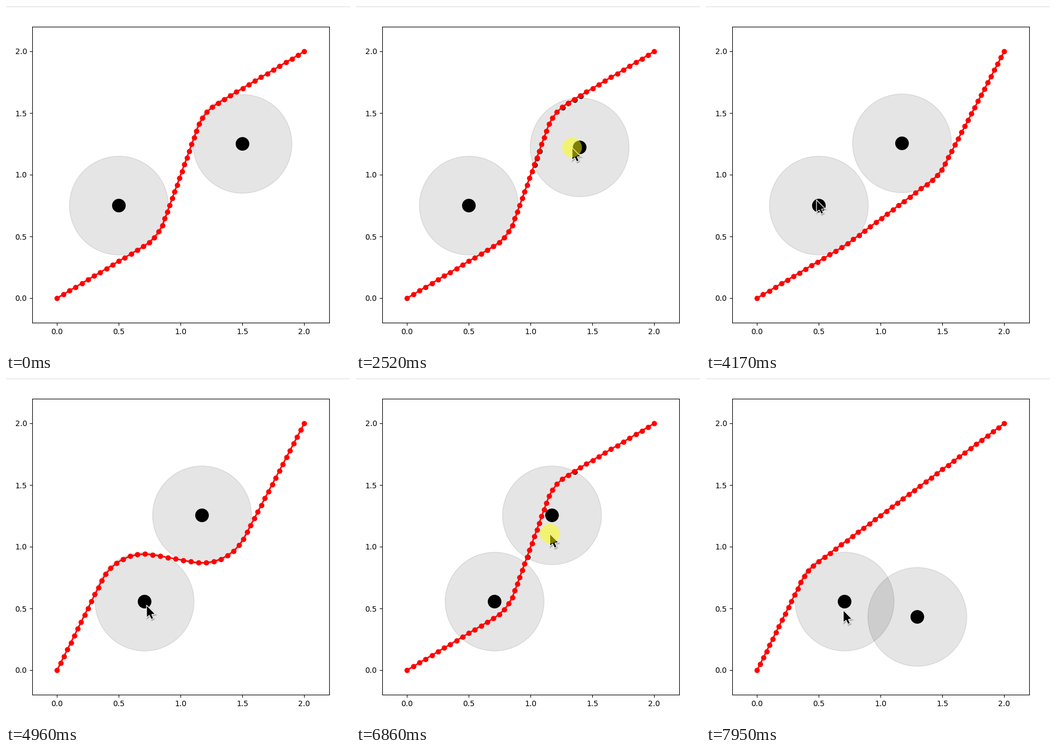
Recreate the animation shown at these times as a matplotlib script. Size 629 by 630 pixels, loop 8000 ms.

```python
import math

import numpy as np
import matplotlib.pyplot as plt
from matplotlib.animation import FuncAnimation
from matplotlib.lines import Line2D
from matplotlib.patches import Circle, Polygon

W, H, DPI = 629, 630, 100
STEP, LOOP = 20, 8000
SCALE = 226.0            # pixels per data unit
X0, Y0 = 93.4, 535.0     # pixel position of the data origin
RADIUS, CORE = 0.4, 0.052
CLEARANCE = 0.386        # radius the path keeps around a disc
POINTS = 52
LAG = 80                 # ms the dragged disc trails the pointer

# pointer moves: begin, end, goal and, for curved ones, a control point
ENTRY = (535, 628)
MOVES = [
    (350, 1170, (464, 288), (340, 390)),
    (1420, 1700, (458, 254)),
    (1880, 2140, (432, 252)),
    (2200, 2840, (358, 251), (395, 267)),
    (3060, 3500, (243, 283)),
    (3520, 4080, (202, 355)),
    (4200, 4270, (210, 372)),
    (4340, 4800, (257, 416)),
    (5140, 5860, (388, 322)),
    (5960, 6100, (391, 284)),
    (6100, 6640, (357, 254)),
    (6790, 7000, (347, 374)),
    (7000, 7250, (385, 440)),
    (7440, 7920, (251, 425), (340, 475)),
]

# disc index, press time, release time
DRAGS = [(1, 2180, 3000), (0, 4290, 4920), (1, 6750, 7400)]
# side of each disc kept by the path after every release; 0 ignores the disc
SIDES = [(1, -1), (1, 1), (-1, 1), (-1, 0)]
HOME = [np.array([0.5, 0.75]), np.array([1.5, 1.25])]
ARROW = np.array([(0, 0), (0, 23), (5, 18.6), (8.6, 26), (12.6, 24.2),
                  (9.4, 17), (16, 16.4)])


def to_data(p):
    p = np.asarray(p, float)
    return np.stack([(p[..., 0] - X0) / SCALE, (Y0 - p[..., 1]) / SCALE], -1)


def pointer(t):
    pos = np.array(ENTRY, float)
    for begin, end, goal, *bend in MOVES:
        if t <= begin:
            break
        s = min((t - begin) / (end - begin), 1)
        s = s * s * (3 - 2 * s)
        goal = np.array(goal, float)
        mid = np.array(bend[0]) if bend else (pos + goal) / 2
        pos = (1 - s)**2 * pos + 2 * s * (1 - s) * mid + s * s * goal
    return pos


def disc_centers(t):
    centers = [c.copy() for c in HOME]
    for k, press, release in DRAGS:
        if t > press:
            now = pointer(min(max(t - LAG, press), release))
            centers[k] += to_data(now) - to_data(pointer(press))
    return centers


def plan(turns):
    """Taut path around discs given as (center, side); side 1 keeps it left."""
    stops = [(np.zeros(2), 0)]
    stops += [(c, s * CLEARANCE) for c, s in turns if s]
    stops += [(np.array([2.0, 2.0]), 0)]
    angles = []
    for (a, ra), (b, rb) in zip(stops, stops[1:]):
        dx, dy = b - a
        angles.append(math.atan2(dy, dx)
                      + math.asin((ra - rb) / math.hypot(dx, dy)))
    pts = [stops[0][0]]
    for (c, r), a0, a1 in zip(stops[1:-1], angles, angles[1:]):
        for a in np.linspace(a0, a1, 40):
            pts.append(c + r * np.array([math.sin(a), -math.cos(a)]))
    pts = np.array(pts + [stops[-1][0]])
    run = np.r_[0, np.cumsum(np.hypot(*np.diff(pts, axis=0).T))]
    u = np.linspace(0, run[-1], POINTS)
    return np.column_stack([np.interp(u, run, pts[:, k]) for k in (0, 1)])


SETTLED = [0] + [release + LAG for _, _, release in DRAGS]
PLANS = [plan(zip(disc_centers(t), sides))
         for t, sides in zip(SETTLED, SIDES)]


def path_at(t):
    """A drag brings back the first plan; its release brings the next one."""
    if any(press + LAG / 2 <= t < release for _, press, release in DRAGS):
        return PLANS[0]
    return PLANS[sum(t >= release for _, _, release in DRAGS)]


def touched(path, t):
    """Points that the rim of the dragged disc has just passed."""
    hit = np.zeros(POINTS, bool)
    for k, press, release in DRAGS:
        if press + LAG < t < release:
            for back in (0, LAG / 2, LAG):
                gap = np.hypot(*(path - disc_centers(t - back)[k]).T)
                hit |= abs(gap - RADIUS) < 0.03
    return path[hit]


plt.rcParams["font.family"] = "DejaVu Sans"
fig = plt.figure(figsize=(W / DPI, H / DPI), dpi=DPI, facecolor="white")
side = 2.4 * SCALE
ax = fig.add_axes([(X0 - 0.2 * SCALE) / W, (H - Y0 - 0.2 * SCALE) / H,
                   side / W, side / H])
ax.set(xlim=(-0.2, 2.2), ylim=(-0.2, 2.2))
ax.set_xticks(np.arange(0, 2.1, 0.5))
ax.set_yticks(np.arange(0, 2.1, 0.5))
fig.add_artist(Line2D([0, 1], [1 - 0.5 / H] * 2, color="#dcdcdc", lw=0.72))

discs = [ax.add_patch(Circle(c, RADIUS, color="black", alpha=0.1, zorder=1))
         for c in HOME]
cores = [ax.add_patch(Circle(c, CORE, color="black", zorder=1.5))
         for c in HOME]
marks, = ax.plot([], [], "ko", ms=6, zorder=2)
route, = ax.plot([], [], "ro-", lw=2, ms=6, zorder=3)


def arrow_patch(**style):
    return ax.add_patch(Polygon(ARROW, closed=True, clip_on=False, **style))


shadows = [arrow_patch(fc="black", ec="black", lw=w, alpha=0.08, zorder=5)
           for w in (0.5, 1.5, 2.5)]
arrow = arrow_patch(fc="black", ec="white", lw=0.9, zorder=6)
halo = ax.add_patch(Circle((0, 0), 18 / SCALE, fc="yellow", ec="none",
                           alpha=0.5, zorder=7))


def update(i):
    t = i * STEP
    for c, disc, core in zip(disc_centers(t), discs, cores):
        disc.center = core.center = tuple(c)
    path = path_at(t)
    route.set_data(path[:, 0], path[:, 1])
    black = touched(path, t) + np.array([0.8, -0.6]) / SCALE
    marks.set_data(black[:, 0], black[:, 1])

    tip = pointer(t)
    shown = t > MOVES[0][0]
    arrow.set_xy(to_data(ARROW + tip))
    arrow.set_visible(shown)
    for shadow in shadows:
        shadow.set_xy(to_data(ARROW + tip + (1, 1.6)))
        shadow.set_visible(shown)
    halo.center = tuple(to_data(tip))
    halo.set_visible(any(a <= t < b for _, a, b in DRAGS))
    return [*discs, *cores, marks, route, *shadows, arrow, halo]


anim = FuncAnimation(fig, update, frames=LOOP // STEP, interval=STEP,
                     repeat=True, repeat_delay=0)
plt.show()
```
